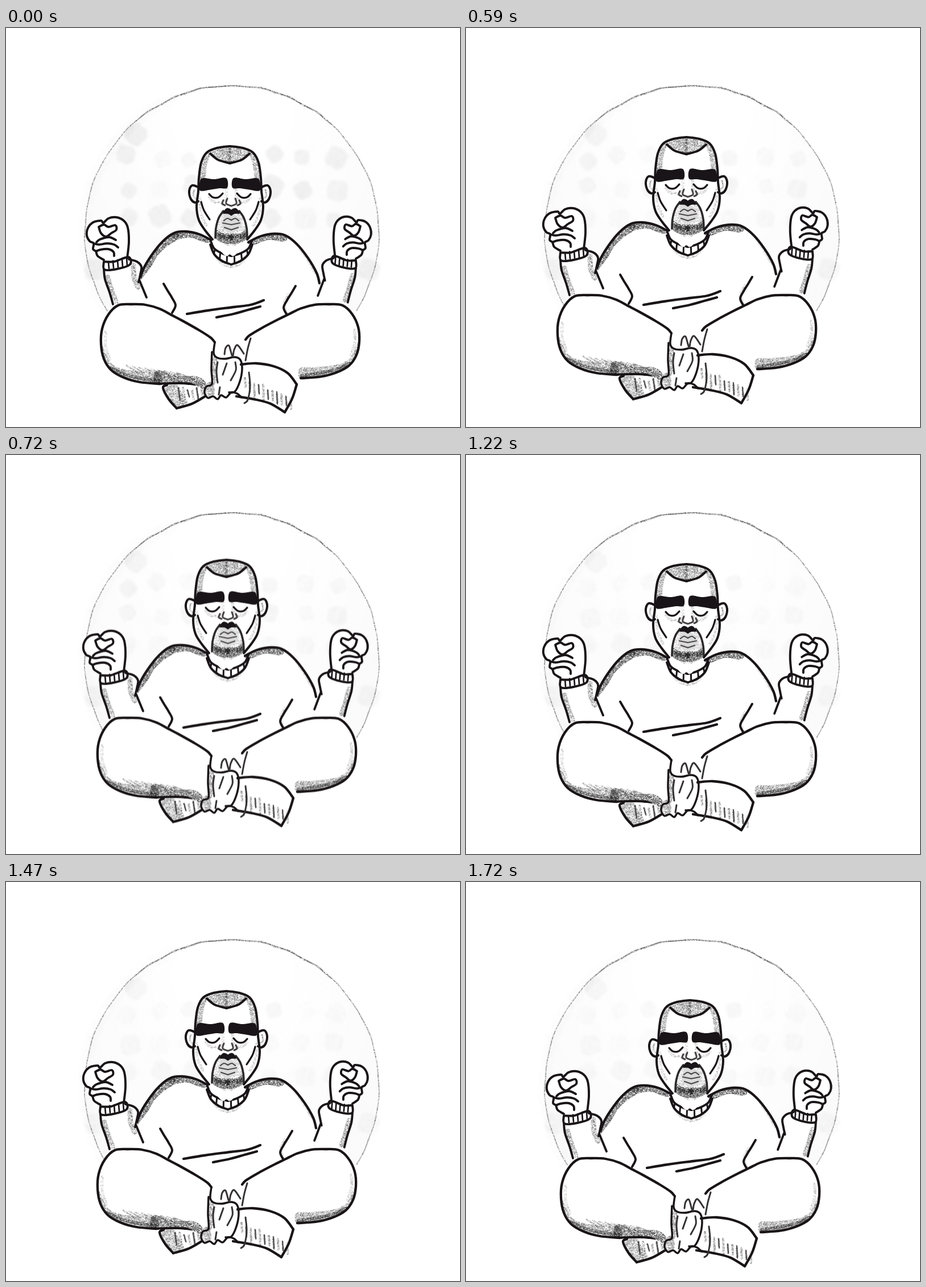
An HTML page with a canvas for the animation above (2140 ms loop, 798 px wide and 702 px high).

```html
<!DOCTYPE html>
<html lang="en">
<head>
<meta charset="utf-8">
<title>Meditation</title>
<style>
html, body { margin: 0; width: 100%; height: 100%; overflow: hidden; background: #fff; }
canvas { display: block; }
</style>
</head>
<body>
<canvas id="stage" width="798" height="702"></canvas>
<script>
const W = 798, H = 702, LOOP = 2140;
const INK = '#191417';
const ctx = document.getElementById('stage').getContext('2d');

let seed = 7;
function rnd(lo = 0, hi = 1) {
  seed = (seed * 16807) % 2147483647;
  return lo + (hi - lo) * seed / 2147483647;
}

function layer(w = W, h = H) {
  const c = document.createElement('canvas');
  c.width = w;
  c.height = h;
  const g = c.getContext('2d');
  g.lineCap = g.lineJoin = 'round';
  return g;
}

// Speckled tile used as a charcoal stroke or fill
function grain(level, count, alpha) {
  const g = layer(160, 160);
  g.fillStyle = `rgb(${level},${level},${level})`;
  for (let i = 0; i < count; i++) {
    g.globalAlpha = alpha * rnd(0.4, 1);
    g.fillRect(rnd(0, 160), rnd(0, 160), rnd(0.8, 1.8), 1);
  }
  return g.createPattern(g.canvas, 'repeat');
}
const DARK = grain(40, 30000, 0.6);
const MID = grain(75, 22000, 0.48);
const SOFT = grain(105, 14000, 0.35);
const DUST = grain(120, 5000, 0.1);

// Mirror images: x becomes sum - kx * x
const flip = (sum, kx = 1, ky = 1, dy = 0) => new DOMMatrix([-kx, 0, 0, ky, sum, dy]);
const SAME = new DOMMatrix();
const ONE = [SAME];
const FACE = [SAME, flip(787)];
const BEARD = [SAME, flip(792)];
const CHEST = [SAME, flip(786, 1, 1, 4)];
const ARMS = [SAME, flip(768, 0.89, 0.985, 4)];
const LEGS = [SAME, flip(788, 1, 0.93, 34)];

// Smooth path through "x y x y ..." points
function curve(text, closed) {
  const v = text.split(' ').map(Number), p = [];
  for (let i = 0; i < v.length; i += 2) p.push([v[i], v[i + 1]]);
  const n = p.length;
  const at = i => closed ? p[(i + n) % n] : p[Math.max(0, Math.min(n - 1, i))];
  const path = new Path2D();
  path.moveTo(...p[0]);
  for (let i = 0; i < (closed ? n : n - 1); i++) {
    const [a, b, c, d] = [at(i - 1), at(i), at(i + 1), at(i + 2)];
    path.bezierCurveTo(
      b[0] + (c[0] - a[0]) / 6, b[1] + (c[1] - a[1]) / 6,
      c[0] - (d[0] - b[0]) / 6, c[1] - (d[1] - b[1]) / 6, c[0], c[1]);
  }
  if (closed) path.closePath();
  return path;
}

function placed(text, closed, m) {
  const path = new Path2D();
  path.addPath(curve(text, closed), m);
  return path;
}

function ink(g, sides, lines, width = 4.3, style = INK) {
  g.lineWidth = width;
  g.strokeStyle = style;
  for (const m of sides) for (const l of lines) g.stroke(placed(l, false, m));
}

function fill(g, sides, shapes, style = '#fff') {
  g.fillStyle = style;
  for (const m of sides) for (const s of shapes) g.fill(placed(s, true, m));
}

// Row of short strokes, evenly spaced, at(i) gives [x, y, x2, y2]
const strokes = (n, at) => Array.from({ length: n }, (_, i) => at(i).join(' '));

// ---- Moon ----
const CX = 397, CY = 360, R = 258.5;
const FROM = Math.PI - 0.56, TO = 2 * Math.PI + 0.56;

function blob(g, x, y, r, tone) {
  const path = new Path2D();
  for (let a = 0; a < 6.28; a += 0.16) {
    const k = r * (1 + 0.07 * Math.sin(4 * a + x) + 0.04 * Math.sin(7 * a + y));
    path.lineTo(x + k * Math.cos(a), y + k * Math.sin(a));
  }
  g.fillStyle = `rgba(40,40,40,${tone})`;
  g.fill(path);
  g.fillStyle = DUST;
  g.fill(path);
}

function rim(g, from, to, wobble, width, style) {
  g.beginPath();
  for (let a = from; a <= to; a += 0.01) {
    const r = R + wobble * Math.sin(a * 31) + 0.6 * Math.sin(a * 13);
    g.lineTo(CX + r * Math.cos(a), CY + r * Math.sin(a));
  }
  g.lineWidth = width;
  g.strokeStyle = style;
  g.stroke();
}

// Craters sit on a loose mirrored lattice; contrast fades from look to look
function drawMoon(look) {
  const g = layer();
  const contrast = 0.055 - 0.011 * look;
  const wash = g.createRadialGradient(CX, 150, 90, CX, 240, 290);
  wash.addColorStop(0, 'rgba(60,60,60,0)');
  wash.addColorStop(1, 'rgba(60,60,60,0.025)');
  g.fillStyle = wash;
  g.beginPath();
  g.arc(CX, CY, R, FROM, TO);
  g.fill();
  g.filter = 'blur(2px)';
  rim(g, FROM, 4.3, 0, 22, DUST);
  seed = 90 + look;
  for (const side of [-1, 1]) {
    for (let row = 0; row < 3; row++) {
      for (let col = 0; col < 3; col++) {
        const x = CX + side * (70 + 56 * col), y = 228 + 54 * row;
        blob(g, x + rnd(-6, 6), y + rnd(-7, 7), rnd(14, 21), contrast * rnd(0.2, 1));
      }
    }
    blob(g, CX + side * 241, 425, 20, contrast * 0.7);
  }
  blob(g, 228, 187, 20, contrast);
  g.filter = 'none';
  rim(g, FROM, TO, 0.3, 2.6, SOFT);
  rim(g, FROM, TO, 0.3, 1.5, MID);
  rim(g, 4, 5.45, 0.7, 2.2, MID);
  rim(g, 4.1, 4.5, 1.5, 3, SOFT);
  rim(g, 4.9, 5.4, 1.5, 3, SOFT);
  return g.canvas;
}

// ---- Figure ----
const SHOULDER = '360 373 340 363 315 358 295 361 275 376 255 401 240 427 235 445';
const LEG = '367 553 360 545 340 532 310 515 291 505 270 494 245 487 220 486 197 488 180 504 169 529 167 556 172 582 185 602 207 615 235 623 270 626';
const HAND = '213 405 216 376 214 351 207 339 194 333 180 335 171 343 167 339 153 342 144 352 142 365 147 375 154 379 153 389 158 393 161 401 172 408';
const HALF_HEAD = '393 208 371 211 353 219 343 237 339 264 338 287 335 315 339 338 350 356 363 372';
const EAR = '338 280 327 277 322 287 325 301 332 307 338 305';

function drawArms(g) {
  fill(g, ARMS, ['172 418 216 405 237 418 236 436 247 475 230 500 188 488 182 465 174 442', HAND]);
  ink(g, ARMS, ['179 438 186 462 194 482'], 8, MID);
  ink(g, ONE, ['224 418 225 438 232 456'], 9, MID);
  ink(g, ARMS, [
    HAND,
    '163 350 172 346 180 350 192 347 194 355 185 361 176 367 167 361 163 350',
    '159 377 165 372 181 368 193 373',
    '154 379 163 381 178 379 190 381 197 386',
    '158 393 166 390 180 389 189 394 190 401',
    '172 411 190 411 215 403 218 416 195 424 173 425 172 411',
    '216 407 230 411 238 420 236 434 233 447',
    '172 424 174 442 182 465 188 486',
    '235 445 247 474'
  ], 3.9);
  ink(g, ARMS, strokes(5, i => [180 + 8 * i, 411 - 1.4 * i, 181 + 8 * i, 423 - 1.2 * i]), 2.7);
}

function drawTorso(g) {
  fill(g, CHEST, ['395 390 ' + SHOULDER + ' 240 475 230 520 393 600']);
  fill(g, CHEST, ['297 362 318 360 358 372 352 378 325 369 300 372 292 368'], DARK);
  fill(g, ONE, ['300 361 302 371 281 386 267 400 255 420 242 437 236 444 240 426 255 400 275 376'], DARK);
  ink(g, [flip(786, 1, 1, 4)], ['270 383 255 405 243 426', '290 465 297 480 293 498'], 5, SOFT);
  ink(g, CHEST, [SHOULDER]);
  ink(g, CHEST, ['277 450 284 462 292 475 298 488 292 501'], 4);
  ink(g, ONE, ['318 503 355 497 400 491 430 487 453 479', '370 509 400 503 425 496 447 490']);
}

function drawLegs(g) {
  fill(g, LEGS, [LEG + ' 345 640']);
  fill(g, LEGS, ['170 560 184 589 210 601 245 605 272 607 270 627 235 623 207 615 185 602 172 582'], MID);
  fill(g, ONE, ['265 603 300 612 335 613 351 624 343 637 320 625 265 627'], DARK);
  ink(g, LEGS, ['184 598 210 610 240 617 268 621'], 6, DARK);
  ink(g, LEGS, ['175 535 175 560 182 583'], 5, SOFT);
  ink(g, ONE, strokes(9, i => [212 + 11 * i, 594 + 1.6 * i, 232 + 11 * i, 606 + i]), 3, MID);
  ink(g, LEGS, [LEG]);
  ink(g, ONE, ['270 626 310 625 330 629 344 645']);
}

function drawFeet(g) {
  seed = 31;
  fill(g, ONE, ['413 591 440 589 470 595 512 627 490 677 440 654 405 648', '283 628 276 632 300 670 350 648 335 630']);
  fill(g, ONE, ['280 633 300 628 308 640 319 660 301 667 288 653'], MID);
  fill(g, ONE, ['350 630 361 622 367 640 360 652 350 646', '362 585 371 580 370 620 362 625'], MID);
  const right = strokes(11, i => {
    const x = 420 + 8 * i, y = 616 + 2.8 * i + rnd(0, 8);
    return [x, y, x + 1, y + rnd(15, 27)];
  });
  const left = strokes(6, i => [303 + 8 * i, rnd(632, 638), 306 + 8 * i, rnd(646, 656)]);
  ink(g, ONE, [...right, ...left], 4, MID);
  ink(g, ONE, [...right, ...left].filter((s, i) => i % 2), 2, '#454243');
  ink(g, ONE, [
    '413 592 440 590 470 595 495 607 511 627',
    '511 627 503 652 490 676',
    '490 676 465 661 440 654 405 648',
    '283 628 276 633 286 653 300 669',
    '300 669 327 661 350 648'
  ]);
  ink(g, ONE, [
    '367 553 365 572 371 580 385 582 402 579 412 584 415 600 411 622 402 640 392 641',
    '362 570 361 600 362 626 352 631 349 642 355 651 364 648 372 653 378 646 387 650 396 641 406 643 414 650'
  ], 3.5);
  ink(g, ONE, [
    '384 574 386 563 392 559 398 578 401 566 407 558 418 573',
    '430 546 425 564 421 585', '403 588 404 602 395 620',
    '372 588 370 604 372 624', '427 606 429 630 425 654 419 660',
    '376 632 374 645', '388 590 381 610'
  ], 3, '#353233');
}

function drawCollar(g) {
  fill(g, BEARD, ['358 377 366 389 385 399 398 402 398 417 378 410 363 396']);
  ink(g, BEARD, ['372 406 383 416 396 420'], 6, SOFT);
  ink(g, BEARD, ['360 375 366 388 381 397 396 401', '359 381 366 398 380 410 396 416'], 3.9);
  const rib = i => {
    const a = 2.5 - i * 0.36, c = Math.cos(a), s = Math.sin(a);
    return [396 + 36 * c, 372 + 29 * s, 396 + 38 * c, 372 + 42 * s];
  };
  ink(g, ONE, strokes(6, rib), 3);
}

function drawHead(g) {
  fill(g, FACE, [HALF_HEAD + ' 394 392', EAR]);
  // Hair
  fill(g, FACE, ['359 220 371 212 394 208 394 238 374 232'], MID);
  fill(g, FACE, ['344 238 353 220 359 222 353 242 350 264 340 267'], MID);
  // Face tone
  ink(g, FACE, ['341 300 342 325 352 347', '357 297 364 305 374 307'], 5, SOFT);
  ink(g, BEARD, ['388 284 386 300 380 309'], 5, SOFT);
  // Beard and mouth
  fill(g, BEARD, ['396 322 382 323 374 335 369 352 368 370 380 378 396 380'], SOFT);
  fill(g, BEARD, ['396 329 384 333 379 344 383 354 396 358'], '#dadada');
  fill(g, BEARD, ['368 355 381 361 397 363 397 379 382 378 370 371'], DARK);
  ink(g, BEARD, ['372 364 384 368 396 369'], 8, DARK);
  ink(g, BEARD, ['382 322 374 334 369 352 368 369'], 3.6, '#2b2829');
  fill(g, BEARD, ['381 326 388 317 397 321 397 330 390 327'], INK);
  ink(g, BEARD, ['383 339 389 335 396 338', '381 343 396 346', '384 351 396 355'], 2.2, '#4a4748');
  // Brows, eyes, nose, cheeks
  fill(g, FACE, ['341 269 347 264 366 266 387 264 389 281 375 282 362 284 341 286'], INK);
  ink(g, FACE, ['357 292 364 298 373 298 381 291', '343 306 348 321 358 337'], 3.2);
  ink(g, BEARD, ['382 303 380 309 385 312', '389 300 387 309 396 313'], 3, '#454243');
  // Outline and ears
  ink(g, FACE, [HALF_HEAD, EAR, '359 221 373 232 394 238'], 4);
  ink(g, FACE, ['331 285 329 294 334 300'], 3, MID);
}

function drawFigure() {
  const g = layer();
  for (const part of [drawTorso, drawArms, drawLegs, drawFeet, drawCollar, drawHead]) part(g);
  return g.canvas;
}

const moons = [0, 1, 2, 3].map(drawMoon);
const figure = drawFigure();

const MOON_STARTS = [460, 590, 1220];

function lift(t) {
  if (t < 590 || t >= 1550) return 0;
  return t >= 720 && t < 970 ? 23.5 : 16;
}

function draw() {
  const t = performance.now() % LOOP;
  const up = lift(t);
  ctx.fillStyle = '#fff';
  ctx.fillRect(0, 0, W, H);
  ctx.drawImage(moons[MOON_STARTS.filter(s => s <= t).length], 0, 0);
  ctx.drawImage(figure, up ? -6 : 0, -up);
  requestAnimationFrame(draw);
}
draw();
</script>
</body>
</html>
```
